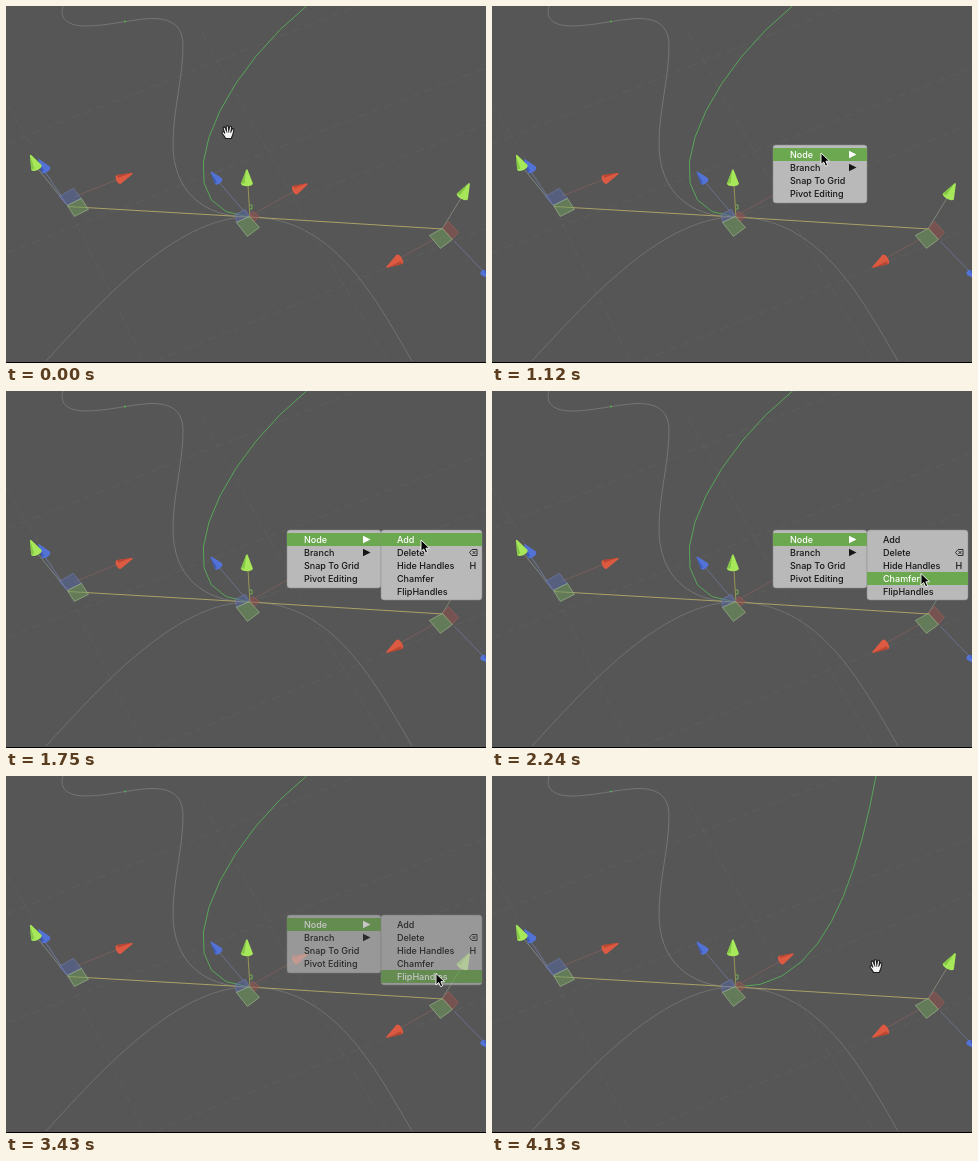
Recreate the animation shown at these times as an HTML page. Size 480 px wide and 357 px high, loop 4200 ms.

```html
<!DOCTYPE html>
<html lang="en">
<head>
<meta charset="utf-8">
<title>Flip handles</title>
<style>
  html, body { margin: 0; width: 100%; height: 100%; overflow: hidden; background: #565656; }
  svg { display: block; width: 100%; height: 100%; }
  text { font: 500 9px Inter, "Open Sans", sans-serif; fill: #161616; }
  .on text { fill: #fff; }
  .on .mark { fill: #fff; }
  .bar { fill: none; }
  .on .bar { fill: #6ba84f; }
  .panel { fill: #b9b9b9; stroke: #8d8d8d; stroke-width: .5; }
  .line { fill: none; stroke-width: 1; }
</style>
</head>
<body>
<svg id="stage" viewBox="0 0 480 357" preserveAspectRatio="none">
  <rect width="480" height="357" fill="#565656"/>
  <g class="line" stroke="#fff" stroke-opacity=".04" stroke-dasharray="9 5">
    <path d="M0 97L62 201L138 355M196 27L299 212L382 355M0 247L480 62M0 138L352 0M150 355L480 222M240 213L480 118"/>
  </g>
  <g class="line">
    <path stroke="#757575" d="M57 0C53 13 62 20 80 20C100 20 122 14 144 12.500C166 12 177 20 177 40C177 72 167 104 167 138C167 185 197 211 243 211"/>
    <path stroke="#717171" d="M40 355C90 301 168 211 243 211C327 211 368 290 406 355"/>
    <path id="spline" stroke="#57a657"/>
    <path stroke="#aaa066" d="M62 200.500L243 211L437 223"/>
  </g>
  <circle cx="119" cy="15.500" r="1" fill="#52b552"/>
  <g id="gizmos" transform="translate(-.6 -.6)"></g>
  <path fill="none" stroke="#72b052" stroke-width="1" d="M243.500 199h2.500v4h-2"/>
  <rect y="356" width="480" height="1" fill="#000"/>
  <g id="menus">
    <g id="main"></g>
    <g id="sub"></g>
  </g>
  <path id="arrow" fill="#000" stroke="#fff" stroke-width=".9" stroke-linejoin="round"
    d="M0 0V11.500L2.700 9L4.600 13.200L6.700 12.300L4.900 8.200H8.600Z"/>
  <g id="hand" stroke="#1c1c1c" stroke-linejoin="round">
    <path fill="#f4f4f4" stroke-width="1.100" d="M-2.500 6C-3 4-5.800 1.800-6 .2C-6-1.200-4.200-1-3.200 .6L-4.800-3.800C-5-5.600-3.200-6-2.600-4.400L-1.600-1.800L-1.800-5.800C-1.600-7.300 .2-7.300 .4-5.800L.7-2L1.600-5.400C2.200-6.900 3.800-6.300 3.600-4.900L3.100-1.300L4.200-3.300C5-4.400 6.300-3.700 5.900-2.400C5.200-.3 5.200 2 4 4L3.400 6Z"/>
    <path fill="none" stroke-width=".8" d="M-1.600-2L-1 .2M.7-2V.2M3.100-1.500L2.500 .4"/>
  </g>
</svg>
<script>
const LOOP = 4200, STEP = 70;
const $ = id => document.getElementById(id);
const RED = ['#dc5a42', '#a33a28'], GREEN = ['#a6e85a', '#70b038'], BLUE = ['#5272d6', '#3450a8'];

// Cone from its tip to the centre of its base, with one shaded side and a rounded base.
function cone(tx, ty, bx, by, width, [light, dark]) {
  const angle = Math.atan2(by - ty, bx - tx) * 180 / Math.PI;
  const len = Math.hypot(bx - tx, by - ty), r = width / 2;
  return `<g transform="translate(${tx} ${ty}) rotate(${angle})">
    <path fill="${light}" d="M0 -.6L${len} ${-r}A2.800 ${r} 0 0 1 ${len} ${r}L0 .6Z"/>
    <path fill="${dark}" fill-opacity=".6" d="M0 .6L${len} ${r * .4}L${len} ${r}Z"/></g>`;
}
const axis = (d, color) => `<path class="line" d="${d}" stroke="${color}" stroke-opacity=".7"/>`;
const face = (points, fill, edge) =>
  `<polygon points="${points}" fill="${fill}" fill-opacity=".55" stroke="${edge}" stroke-width=".7"/>`;
const greenFace = points => face(points, '#6f9a5c', '#9bb08a');
const blueFace = points => face(points, '#5a68a0', '#707ca8');
const redFace = points => face(points, '#92504c', '#98605c');

$('gizmos').innerHTML = [
  axis('M62 200L33 164', '#8c9a96'), axis('M62 200L40 167', '#7484b8'), axis('M70 191L112 174', '#85615d'),
  cone(33, 154, 40.5, 164, 10, BLUE), cone(25, 149.5, 31, 162, 11.5, GREEN), cone(127, 168, 113.5, 174, 9.5, RED),
  blueFace('54,191 68,183 76,193 62,200'), greenFace('62,200 76,193 83,204 69,211'),

  axis('M243 211L213 176', '#747da4'), axis('M244.500 211L242.500 178', '#b4ae58'), axis('M244 211L290 185', '#85615d'),
  cone(205.5, 166.5, 213, 175.5, 9, BLUE), cone(241.5, 164, 241.5, 178, 12, GREEN), cone(302, 178.5, 290, 184.5, 9.5, RED),
  blueFace('230,209 240,204 244,211 231,217'), redFace('244,211 247,206 254,211 249,216'),
  greenFace('231,217 244,211 254,222 242,231'),

  axis('M437 223L456 192', '#8f9a86'), axis('M430 233L396 252', '#85615d'), axis('M449 236L478 266', '#747da4'),
  cone(464, 178, 457, 191, 12.5, GREEN), cone(381, 262, 394, 254, 11, RED), cone(485, 273, 478, 267.5, 6, BLUE),
  redFace('437,223 443,216 453,227 447,234'), greenFace('424,230 437,223 447,234 435,243')
].join('');

const ROW = 13, TOP = 142;
function menu(id, x, width, height, textX, items) {
  const rows = items.map(([label, extra = ''], i) => {
    const y = TOP + i * ROW;
    return `<g class="row"><rect class="bar" x="${x}" y="${y}" width="${width}" height="${ROW}"/>
      <text x="${textX}" y="${y + 9.600}">${label}</text>
      <g transform="translate(0 ${y + 6.500})">${extra}</g></g>`;
  });
  $(id).innerHTML =
    `<rect class="panel" x="${x}" y="139" width="${width}" height="${height}" rx="3"/>` + rows.join('');
  return [...$(id).querySelectorAll('.row')];
}
const more = '<path class="mark" fill="#161616" d="M357-3.700L364.500 0L357 3.700Z"/>';
const erase = '<path fill="none" stroke="#222" stroke-width=".9" d="M463.500 0L466-3H471V3H466ZM466.500-1.500L469.500 1.500M469.500-1.500L466.500 1.500"/>';
const mainRows = menu('main', 281, 94, 58, 298,
  [['Node', more], ['Branch', more], ['Snap To Grid'], ['Pivot Editing']]);
const subRows = menu('sub', 375, 101, 70, 391,
  [['Add'], ['Delete', erase], ['Hide Handles', '<text x="463.500" y="3.100">H</text>'], ['Chamfer'], ['FlipHandles']]);

// The editor draws its splines as short straight segments.
function segments(a, b, c, d, count = 10) {
  const at = (t, i) => (1 - t) ** 3 * a[i] + 3 * t * (1 - t) ** 2 * b[i] + 3 * t * t * (1 - t) * c[i] + t ** 3 * d[i];
  return 'M' + Array.from({ length: count + 1 }, (_, n) => `${at(n / count, 0)} ${at(n / count, 1)}`).join('L');
}
const NODE = [243, 211];
const BEFORE = segments(NODE, [153, 205], [207, 75], [300.5, 0]);
const AFTER = segments(NODE, [332, 213], [364, 105], [384, 0]);

// Pointer path: time, x, y.
const PATH = [
  [0, 222, 126.5], [560, 281, 139], [840, 281, 139], [1120, 329, 147], [1330, 345, 149],
  [1400, 345, 149], [1750, 415, 149], [1960, 417, 150], [2240, 429, 182.500],
  [2450, 430, 187], [2660, 430, 197.500], [3710, 430, 197.500], [4130, 384, 190.5]
];
function pointer(t) {
  const i = PATH.findIndex(p => p[0] > t);
  if (i < 0) return PATH.at(-1).slice(1);
  const [t0, x0, y0] = PATH[i - 1], [t1, x1, y1] = PATH[i];
  const u = (t - t0) / (t1 - t0), k = u * u * (3 - 2 * u);
  return [x0 + (x1 - x0) * k, y0 + (y1 - y0) * k];
}

const OPEN = 910, SUB = 1330, FADE = 3360, CLOSE = 3570;
const show = (el, on) => el.setAttribute('visibility', on ? 'visible' : 'hidden');
const select = (rows, n) => rows.forEach((row, i) => row.classList.toggle('on', i === n));

function draw(t) {
  const [x, y] = pointer(t);
  const open = t >= OPEN && t < CLOSE, sub = open && t >= SUB;
  const row = Math.floor((y - TOP) / ROW);
  const blink = t >= 3080 && t < 3150;

  $('spline').setAttribute('d', t < CLOSE ? BEFORE : AFTER);
  show($('main'), open);
  show($('sub'), sub);
  $('menus').setAttribute('opacity', t < FADE ? 1 : Math.max(0, 1 - (t - FADE) / (CLOSE - FADE)));
  select(mainRows, sub ? 0 : row);
  select(subRows, x > 375 && !blink ? row : -1);

  show($('arrow'), open);
  show($('hand'), !open);
  for (const id of ['arrow', 'hand']) $(id).setAttribute('transform', `translate(${x} ${y})`);
}

const start = performance.now();
function tick() {
  const t = (performance.now() - start) % LOOP;
  draw(Math.floor(t / STEP) * STEP);
  requestAnimationFrame(tick);
}
draw(0);
requestAnimationFrame(tick);
</script>
</body>
</html>
```
